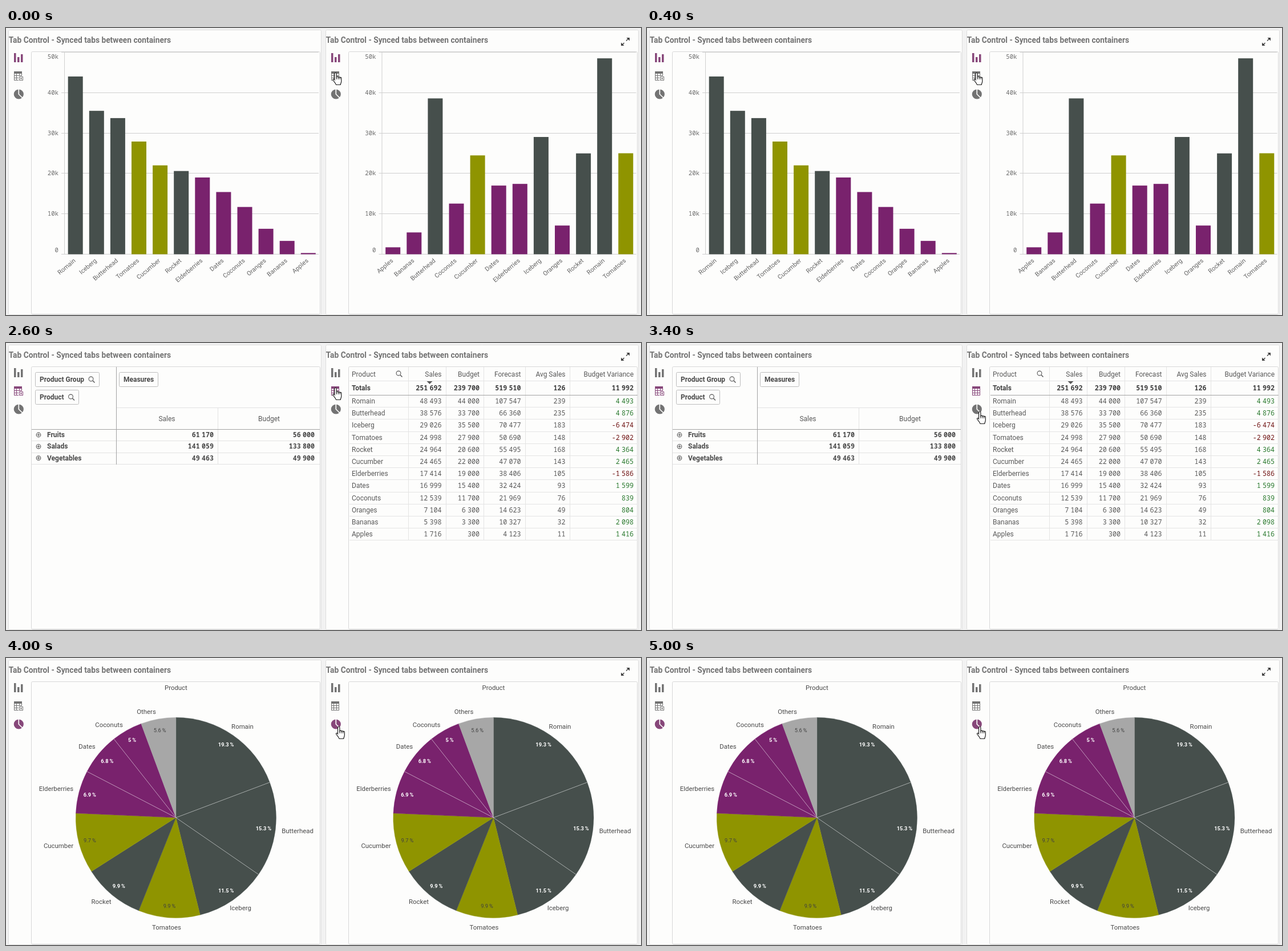
Recreate the animation shown at these times as an HTML page with a canvas. Size 1113x503 px, loop 5200 ms.

```html
<!DOCTYPE html>
<html lang="en">
<head>
<meta charset="utf-8">
<title>Synced tabs</title>
<style>
html, body { margin: 0; width: 100%; height: 100%; overflow: hidden; background: #f2f2f2; }
canvas { display: block; }
</style>
</head>
<body>
<canvas id="stage" width="1113" height="503"></canvas>
<script>
const ctx = document.getElementById('stage').getContext('2d');
const SANS = 'Roboto, sans-serif', MONO = '"Noto Sans Mono", monospace';
const DARK = '#464f4c', OLIVE = '#8f9400', PURPLE = '#79226d';
const GRAY = '#737373', ACTIVE = '#87477a', PAPER = '#fdfdfc';
const SHIFT = 556;
const LOOP = 5200;

// name, colour, sales, budget, forecast, average
const products = [
  ['Romain', DARK, 48493, 44000, 107547, 239],
  ['Butterhead', DARK, 38576, 33700, 66360, 235],
  ['Iceberg', DARK, 29026, 35500, 70477, 183],
  ['Tomatoes', OLIVE, 24998, 27900, 50690, 148],
  ['Rocket', DARK, 24964, 20600, 55495, 168],
  ['Cucumber', OLIVE, 24465, 22000, 47070, 143],
  ['Elderberries', PURPLE, 17414, 19000, 38406, 105],
  ['Dates', PURPLE, 16999, 15400, 32424, 93],
  ['Coconuts', PURPLE, 12539, 11700, 21969, 76],
  ['Oranges', PURPLE, 7104, 6300, 14623, 49],
  ['Bananas', PURPLE, 5398, 3300, 10327, 32],
  ['Apples', PURPLE, 1716, 300, 4123, 11]
].map(([name, color, sales, budget, forecast, avg]) => ({ name, color, sales, budget, forecast, avg }));

const byBudget = [...products].sort((a, b) => b.budget - a.budget);
const byName = [...products].sort((a, b) => a.name < b.name ? -1 : 1);
const total = products.reduce((sum, p) => sum + p.sales, 0);
const top9 = products.slice(0, 9);
const slices = [...top9, {
  name: 'Others', color: '#a7a7a7',
  sales: total - top9.reduce((sum, p) => sum + p.sales, 0)
}];
const sliceLabels = [[414.5, 120], [511, 303], [411, 438], [281.5, 472], [167, 427],
  [92, 329], [88, 228.5], [142, 155], [180.5, 116.5], [246, 94]];

const hand = new Path2D('M3.5 13V2.2a1.7 1.7 0 0 1 3.4 0V8a1.6 1.6 0 0 1 3 .4a1.6 1.6 0 0 1 2.8 .6' +
  'a1.5 1.5 0 0 1 2.6 1.2V15c0 3-1.3 4-1.6 6.5H6C5.5 18.5 3 17 .8 13.5C-.2 11.8 1.8 10.8 3.5 13Z');
const fingers = new Path2D('M6.9 8v4M9.9 8.5v3.5M12.7 9v3');

function rect(x, y, w, h, color) {
  ctx.fillStyle = color;
  ctx.fillRect(x, y, w, h);
}

function outline(color, width, path) {
  ctx.strokeStyle = color;
  ctx.lineWidth = width;
  path ? ctx.stroke(path) : ctx.stroke();
}

function box(x, y, w, h, stroke) {
  ctx.beginPath();
  ctx.roundRect(x + .5, y + .5, w, h, 2);
  ctx.fillStyle = PAPER;
  ctx.fill();
  outline(stroke, 1);
}

function line(color, width, ...points) {
  ctx.beginPath();
  for (let i = 0; i < points.length; i += 2) ctx.lineTo(points[i], points[i + 1]);
  outline(color, width);
}

function text(str, x, y, { size = 12, weight = 400, color = '#595959', align = 'left', family = SANS } = {}) {
  ctx.font = `${weight} ${size}px ${family}`;
  ctx.fillStyle = color;
  ctx.textAlign = align;
  ctx.fillText(str, x, y);
}

// Right-aligned number with a narrow gap between thousands
function number(value, x, y, color = '#595959', weight = 400) {
  const opts = { size: 11.7, weight, color, align: 'right', family: MONO };
  const abs = Math.abs(value), sign = value < 0 ? '-' : '';
  if (abs < 1000) return text(sign + abs, x, y, opts);
  const tail = String(abs % 1000).padStart(3, '0');
  text(tail, x, y, opts);
  text(sign + Math.floor(abs / 1000), x - ctx.measureText(tail).width - 3.2, y, opts);
}

function magnifier(x, y) {
  ctx.beginPath();
  ctx.arc(x - 1, y - 1, 3.9, 0, 7);
  outline('#595959', 1.1);
  line('#595959', 1.5, x + 2, y + 2, x + 5.5, y + 5.5);
}

function tabIcons(active, pivot) {
  const tint = i => i === active ? ACTIVE : GRAY;
  [[14, 44], [20, 51], [26, 46]].forEach(([x, y]) => rect(x, y, 3.5, 60 - y, tint(0)));

  const c = tint(1);
  rect(14, 76, 14, 4, c);
  ctx.strokeStyle = c;
  ctx.lineWidth = 1;
  ctx.strokeRect(14.5, 76.5, 13, 15);
  [83.5, 87.5].forEach(y => line(c, 1, 14, y, 28, y));
  [18.5, 23.5].forEach(x => line(c, 1, x, 79, x, 92));
  if (pivot) {
    rect(22, 84, 9, 9, PAPER);
    ctx.strokeStyle = c;
    ctx.strokeRect(23.5, 85.5, 6, 6);
    line(c, 1, 26.5, 87, 26.5, 90);
    line(c, 1, 25, 88.5, 28, 88.5);
  }

  ctx.beginPath();
  ctx.arc(22.3, 116, 8.6, 0, 7);
  ctx.fillStyle = tint(2);
  ctx.fill();
  line(PAPER, 1.7, 22.3, 107, 22.3, 116, 28.8, 122.5);
}

function panel(x, active, pivot) {
  ctx.save();
  ctx.translate(x, 0);
  box(4, 3, 548, 499, '#dedede');
  text('Tab Control - Synced tabs between containers', 4.7, 26, { size: 13.77, weight: 700, color: '#737373' });
  box(44, 41, 506, 460, '#d8d8d8');
  tabIcons(active, pivot);
  ctx.restore();
}

function expandIcon() {
  const c = '#404040';
  line(c, 1.5, 1087, 22.5, 1091, 18.5);
  line(c, 1.5, 1083.5, 26, 1079.5, 30);
  ctx.fillStyle = c;
  ctx.fill(new Path2D('M1087.5 17h5.5v5.5zM1078 25.5v5.5h5.5z'));
}

function barChart(data, field) {
  const base = 396.5, unit = 70.8;
  for (let i = 0; i <= 5; i++) {
    const y = Math.round(base - i * unit - .5);
    rect(97, y, 451, 1, '#cfcfcf');
    const mid = i === 5 ? 50 : i ? y : 389;
    text(i ? i + '0k' : '0', 92, mid + 4, { size: 10.7, color: '#6b6b6b', align: 'right', family: MONO });
  }
  rect(102, 42, 1, 354, '#cfcfcf');
  data.forEach((p, i) => {
    const x = 108.7 + i * 37.1, h = p[field] / 10000 * unit;
    rect(x, base - h, 26, h, p.color);
    ctx.save();
    ctx.translate(x + 14, 409);
    ctx.rotate(-40 * Math.PI / 180);
    text(p.name, 0, 0, { size: 10.9, color: '#666', align: 'right' });
    ctx.restore();
  });
}

function pivotTable() {
  const bold = { weight: 700, color: '#484848' }, pale = '#e2e2e2';
  [['Product Group', 51, 51, 112, 150], ['Product', 51, 82, 76, 114.5], ['Measures', 198, 51, 68]]
    .forEach(([label, x, y, w, glass]) => {
      box(x, y, w, 25, '#bdbdbd');
      text(label, x + 8, y + 16.5, bold);
      if (glass) magnifier(glass, y + 13);
    });
  rect(193, 113, 357, 1, pale);
  rect(371, 113, 1, 100, pale);
  text('Sales', 282, 136.5, { align: 'center' });
  text('Budget', 461, 136.5, { align: 'center' });
  [['Fruits', 61170, 56000], ['Salads', 141059, 133800], ['Vegetables', 49463, 49900]]
    .forEach(([name, sales, budget], i) => {
      const y = 161 + i * 20.3;
      ctx.beginPath();
      ctx.arc(57, y, 3.8, 0, 7);
      outline('#666', 1.2);
      line('#666', 1.2, 54.5, y, 59.5, y);
      line('#666', 1.2, 57, y - 2.5, 57, y + 2.5);
      text(name, 72, y + 4, bold);
      number(sales, 364, y + 4, '#484848', 700);
      number(budget, 541, y + 4, '#484848', 700);
      rect(45, Math.round(y + 10.3), 505, 1, pale);
    });
  rect(45, 151, 505, 1, '#a3a3a3');
  rect(193, 42, 1, 171, '#a3a3a3');
}

function dataTable() {
  const right = [763.5, 830, 902.5, 980.5, 1100], pale = '#e4e4e4';
  const cells = p => [p.sales, p.budget, p.forecast, p.avg, p.sales - p.budget];
  [705, 771, 837, 910, 988].forEach(x => rect(x, 42, 1, 304, pale));
  rect(602, 66, 505, 1, pale);
  text('Product', 606, 58.5);
  magnifier(689, 54);
  ['Sales', 'Budget', 'Forecast', 'Avg Sales', 'Budget Variance']
    .forEach((label, i) => text(label, right[i], 58.5, { align: 'right' }));
  ctx.fillStyle = '#595959';
  ctx.fill(new Path2D('M737.5 67h10l-5 5z'));
  text('Totals', 606, 83, { weight: 700, color: '#404040' });
  [251692, 239700, 519510, 126, 11992].forEach((v, i) => number(v, right[i], 83, '#404040', 700));
  products.forEach((p, row) => {
    const y = 102 + row * 21.2;
    text(p.name, 606, y + 4);
    cells(p).forEach((v, i) =>
      number(v, right[i], y + 4, i < 4 ? '#595959' : v < 0 ? '#701414' : '#2b7a2f'));
    rect(602, Math.round(y + 10.2), 505, 1, pale);
  });
  rect(602, 91, 505, 1, '#a3a3a3');
}

function pieChart() {
  const cx = 297.9, cy = 279.8, r = 175.6;
  const label = { size: 11.4, align: 'center', color: '#4a4a4a' };
  const at = (a, d) => [cx + d * Math.cos(a), cy + d * Math.sin(a)];
  let start = -Math.PI / 2;
  const seams = [], marks = [];
  text('Product', cx, 55.5, label);
  slices.forEach((s, i) => {
    const end = start + s.sales / total * 2 * Math.PI;
    ctx.beginPath();
    ctx.moveTo(cx, cy);
    ctx.arc(cx, cy, r, start, end);
    ctx.closePath();
    ctx.fillStyle = s.color;
    ctx.fill();
    outline(s.color, .4);
    if (i && s.color === slices[i - 1].color) seams.push(start);
    const share = Math.round(s.sales / total * 1000) / 10;
    marks.push([share + '\u2009%', (start + end) / 2, s.color === DARK || s.color === PURPLE]);
    const [x, y] = sliceLabels[i];
    text(s.name, x, y + 4, label);
    start = end;
  });
  seams.forEach(a => line('rgba(255,255,255,.6)', .8, cx, cy, ...at(a, r)));
  marks.forEach(([share, a, light]) => {
    const [x, y] = at(a, 155.5);
    text(share, x - .8, y + 3, { size: 9.3, align: 'center', weight: light ? 700 : 400, color: light ? '#fff' : '#404040' });
  });
}

function cursor(t) {
  const stops = [[0, 572.5, 78], [2800, 572.5, 95], [3000, 574, 103], [3200, 576, 110], [3400, 578, 120]];
  const [, x, y] = stops.filter(s => s[0] <= t).pop();
  ctx.save();
  ctx.translate(x, y);
  ctx.fillStyle = '#fff';
  ctx.fill(hand);
  outline('#1c1c1c', 1.2, hand);
  outline('#1c1c1c', 1, fingers);
  ctx.restore();
}

function draw(t) {
  const tab = t < 2000 ? 0 : t < 3800 ? 1 : 2;
  rect(0, 0, 1113, 503, '#f2f2f2');
  panel(0, tab, true);
  panel(SHIFT, tab, false);
  expandIcon();

  if (tab === 0) barChart(byBudget, 'budget');
  if (tab === 1) {
    pivotTable();
    if (t >= 2400) dataTable();
  }
  if (t >= 4000) pieChart();

  ctx.save();
  ctx.translate(SHIFT + .5, 0);
  if (tab === 0) barChart(byName, 'sales');
  if (t >= 4000) pieChart();
  ctx.restore();
  cursor(t);
}

function tick() {
  draw(performance.now() % LOOP);
  requestAnimationFrame(tick);
}
tick();
</script>
</body>
</html>
```
